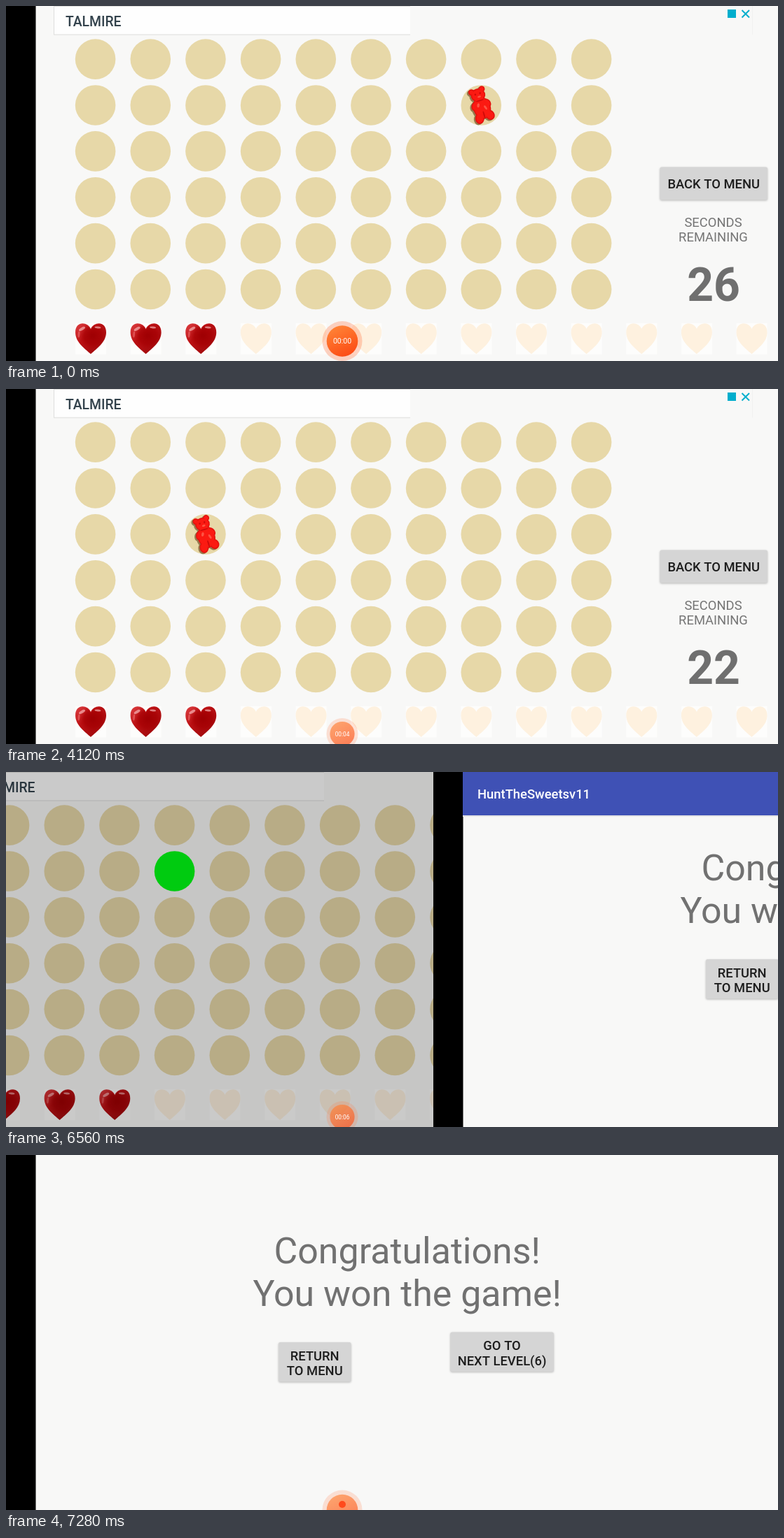
An HTML page with a canvas that plays this animation: 1102x508 px, repeating every 8 s.

```html
<!DOCTYPE html>
<html lang="en">
<head>
<meta charset="utf-8">
<title>Candy catching game</title>
<style>
html, body { margin: 0; width: 100%; height: 100%; overflow: hidden; background: #f8f8f7; }
canvas { display: block; width: 1102px; height: 508px; }
</style>
</head>
<body>
<canvas id="stage" width="1102" height="508"></canvas>
<script>
const W = 1102, H = 508, LOOP = 8000, STEP = 40;
const ctx = document.getElementById('stage').getContext('2d');
const TAU = Math.PI * 2;
const PAPER = '#f8f8f7', CYAN = '#00aecd';

// [start time, column, row]
const HOPS = [
  [0, 7, 1], [120, 1, 4], [600, 5, 2], [1120, 8, 3], [1600, 3, 3], [2080, 6, 4],
  [2600, 1, 1], [3080, 8, 2], [3600, 5, 5], [4120, 2, 2], [4600, 6, 2], [5120, 3, 1]
];
const TICKS = [880, 1880, 2920, 3920, 4920, 5920];
const CAUGHT = 5400, SLIDE = 6498, SLIDE_MS = 556, BAR_GONE = 6600;

const clamp = v => Math.max(0, Math.min(1, v));
const mix = (a, b, k) => a + (b - a) * k;
const cellX = col => 127.6 + 78.67 * col;
const cellY = row => 76.1 + 65.87 * row;

function rect(x, y, w, h, fill) {
  ctx.fillStyle = fill;
  ctx.fillRect(x, y, w, h);
}

function disc(x, y, r, fill) {
  ctx.fillStyle = fill;
  ctx.beginPath();
  ctx.arc(x, y, r, 0, TAU);
  ctx.fill();
}

function oval(x, y, rx, ry, turn = 0) {
  ctx.beginPath();
  ctx.ellipse(x, y, rx, ry, turn, 0, TAU);
  ctx.fill();
}

function label(str, x, y, size, weight, fill, align = 'center') {
  ctx.font = `${weight} ${size}px Roboto, sans-serif`;
  ctx.textAlign = align;
  ctx.fillStyle = fill;
  ctx.fillText(str, x, y);
}

function button(x, y, w, h, lines, baseline) {
  ctx.save();
  ctx.shadowColor = 'rgba(0,0,0,.25)';
  ctx.shadowBlur = 3;
  ctx.shadowOffsetY = 1;
  ctx.fillStyle = '#d5d5d5';
  ctx.beginPath();
  ctx.roundRect(x, y, w, h, 2.5);
  ctx.fill();
  ctx.restore();
  lines.forEach((s, i) => label(s, x + w / 2, baseline + i * 21.6, 18.4, 500, '#1d1d1d'));
}

function heartPath(k) {
  ctx.beginPath();
  ctx.moveTo(0, -14 * k);
  ctx.bezierCurveTo(4 * k, -24 * k, 22 * k, -26 * k, 22 * k, -9 * k);
  ctx.bezierCurveTo(22 * k, 5 * k, 9 * k, 14 * k, 0, 22 * k);
  ctx.bezierCurveTo(-9 * k, 14 * k, -22 * k, 5 * k, -22 * k, -9 * k);
  ctx.bezierCurveTo(-22 * k, -26 * k, -4 * k, -24 * k, 0, -14 * k);
  ctx.closePath();
}

function heart(x, full) {
  rect(x - 22, 454, 44, 44.5, '#fdfdfc');
  ctx.save();
  ctx.translate(x, 476);
  heartPath(1);
  if (!full) {
    ctx.fillStyle = '#fef1df';
    ctx.fill();
    ctx.restore();
    return;
  }
  const glow = ctx.createLinearGradient(-20, -18, 14, 18);
  glow.addColorStop(0, '#d8383b');
  glow.addColorStop(.4, '#bb1013');
  glow.addColorStop(1, '#a00a0d');
  ctx.fillStyle = glow;
  ctx.fill();
  const core = ctx.createRadialGradient(3, -4, 2, 3, -4, 19);
  core.addColorStop(0, '#a00003');
  core.addColorStop(.6, 'rgba(165,0,3,.7)');
  core.addColorStop(1, 'rgba(170,0,3,0)');
  ctx.fillStyle = core;
  heartPath(.9);
  ctx.fill();
  ctx.fillStyle = 'rgba(255,205,205,.6)';
  oval(-12.5, -14, 5, 2, -.5);
  oval(10, -16, 4.5, 1.4, .1);
  ctx.fillStyle = 'rgba(255,150,150,.4)';
  oval(-17, -6, 1.4, 4.5, .1);
  ctx.restore();
}

function bearShape(grow) {
  const parts = [
    [-8, -21.5, 4.5, 4.5, 0], [7.5, -22, 4.5, 4.5, 0],
    [0, -15, 10.5, 9.5, 0], [0, 4, 12.5, 16, 0],
    [-9.5, -1, 4.5, 6.5, .4], [9.5, -1, 4.5, 6.5, -.4],
    [-7.5, 17.5, 6.5, 8, .2], [8, 17, 6.5, 7.5, -.3]
  ];
  for (const [x, y, rx, ry, turn] of parts) oval(x, y, rx + grow, ry + grow, turn);
}

function bear(x, y) {
  ctx.save();
  ctx.translate(x, y);
  ctx.save();
  ctx.translate(-2, 1.5);
  ctx.rotate(-.3);
  ctx.fillStyle = 'rgb(150,122,78)';
  bearShape(0);
  ctx.restore();
  ctx.rotate(-.3);
  ctx.fillStyle = '#e3120e';
  bearShape(0);
  ctx.fillStyle = '#fb1a12';
  bearShape(-1.6);
  ctx.fillStyle = '#cf0b09';
  oval(-3.5, -17, 1.3, 1.3);
  oval(3.5, -17, 1.3, 1.3);
  oval(0, -7, 6, .9);
  oval(0, 14, 1, 5);
  ctx.fillStyle = 'rgba(255,110,90,.7)';
  oval(1, -12.5, 2.5, 1.4);
  oval(-4, -1, 1.8, 3, .4);
  oval(5, 5, 1.5, 3.5, -.3);
  ctx.restore();
}

function banner() {
  rect(68, 0, 509, 41.5, '#dededc');
  rect(69, 1, 508, 39.5, '#fefefe');
  rect(1065, 0, 1, 41, '#f1f1f0');
  label('TALMIRE', 85, 29, 19.4, 500, '#33424c', 'left');
  rect(1030, 5, 12, 12, CYAN);
  ctx.strokeStyle = CYAN;
  ctx.lineWidth = 2;
  ctx.beginPath();
  ctx.moveTo(1050.5, 6);
  ctx.lineTo(1061, 16.5);
  ctx.moveTo(1061, 6);
  ctx.lineTo(1050.5, 16.5);
  ctx.stroke();
}

function gameScreen(t) {
  rect(0, 0, W, H, PAPER);
  rect(0, 0, 42.5, H, '#000');
  banner();
  const [, col, row] = HOPS.filter(h => h[0] <= t).pop();
  const caught = t >= CAUGHT;
  for (let r = 0; r < 6; r++) {
    for (let c = 0; c < 10; c++) {
      const lit = caught && c === col && r === row;
      disc(cellX(c), cellY(r), 28.8, lit ? '#00ff14' : '#e7d8a8');
    }
  }
  if (!caught) bear(cellX(col), cellY(row));
  for (let i = 0; i < 13; i++) heart(121 + 78.63 * i, i < 3);

  if (caught) button(948, 157, 125.5, 46.5, ['NEXT LEVEL'], 187);
  button(933.5, 230.5, 153.5, 47, ['BACK TO MENU'], 261);
  label('SECONDS', 1009.5, 315.5, 18.4, 400, '#757575');
  label('REMAINING', 1009.5, 337, 18.4, 400, '#757575');
  const left = 26 - Math.floor((t + 400) / 1000);
  label(String(Math.max(20, left)), 1010, 421.5, 66, 700, '#6f6f6f');
}

function winScreen(t) {
  rect(0, 0, W, H, PAPER);
  rect(0, 0, 42.5, H, '#000');
  if (t < BAR_GONE) {
    rect(42, 62, W - 42, 2, '#e4e4e6');
    rect(42, 0, W - 42, 62, '#3f51b5');
    label('HuntTheSweetsv11', 63, 38, 18.4, 500, '#fff', 'left');
  }
  label('Congratulations!', 572.7, 155, 51.9, 400, '#717171');
  label('You won the game!', 572.7, 215.5, 51.9, 400, '#717171');
  button(389, 268, 103.5, 56.5, ['RETURN', 'TO MENU'], 293.5);
  button(634.3, 253.5, 147.5, 56.5, ['GO TO', 'NEXT LEVEL(6)'], 279);
}

function bubble(t) {
  const shrink = clamp((t - 1840) / 240);
  const leave = clamp((t - 7200) / 80);
  const y = mix(mix(479.5, 493.5, shrink), 508, leave);
  const k = mix(mix(1, .79, shrink), 1, leave);
  const fill = ctx.createLinearGradient(470, y - 22 * k, 490, y + 22 * k);
  fill.addColorStop(0, '#ff8336');
  fill.addColorStop(1, '#fc4a14');
  ctx.save();
  ctx.globalAlpha = mix(1, .65, shrink);
  disc(480, y, 28.5 * k, 'rgba(255,120,70,.32)');
  disc(480, y, 22.3 * k, fill);
  ctx.restore();
  if (t >= 7240) {
    disc(480, y - 8, 5, '#ff4a1c');
    return;
  }
  const secs = TICKS.filter(s => s <= t).length;
  label('00:0' + secs, 480, y + 3.8 * k, 10.5 * k, 400, '#fff');
}

function draw(t) {
  const p = 1 - Math.pow(1 - clamp((t - SLIDE) / SLIDE_MS), 5);
  ctx.save();
  ctx.translate(Math.round(-275.5 * p), 0);
  if (p < 1) gameScreen(t);
  ctx.restore();
  if (p > 0) {
    rect(0, 0, W, H, `rgba(0,0,0,${.46 * p})`);
    ctx.save();
    ctx.translate(Math.round(W * (1 - p)), 0);
    winScreen(t);
    ctx.restore();
  }
  bubble(t);
}

const start = performance.now();
function frame() {
  const t = (performance.now() - start) % LOOP;
  draw(Math.floor(t / STEP) * STEP);
  requestAnimationFrame(frame);
}
frame();
</script>
</body>
</html>
```
